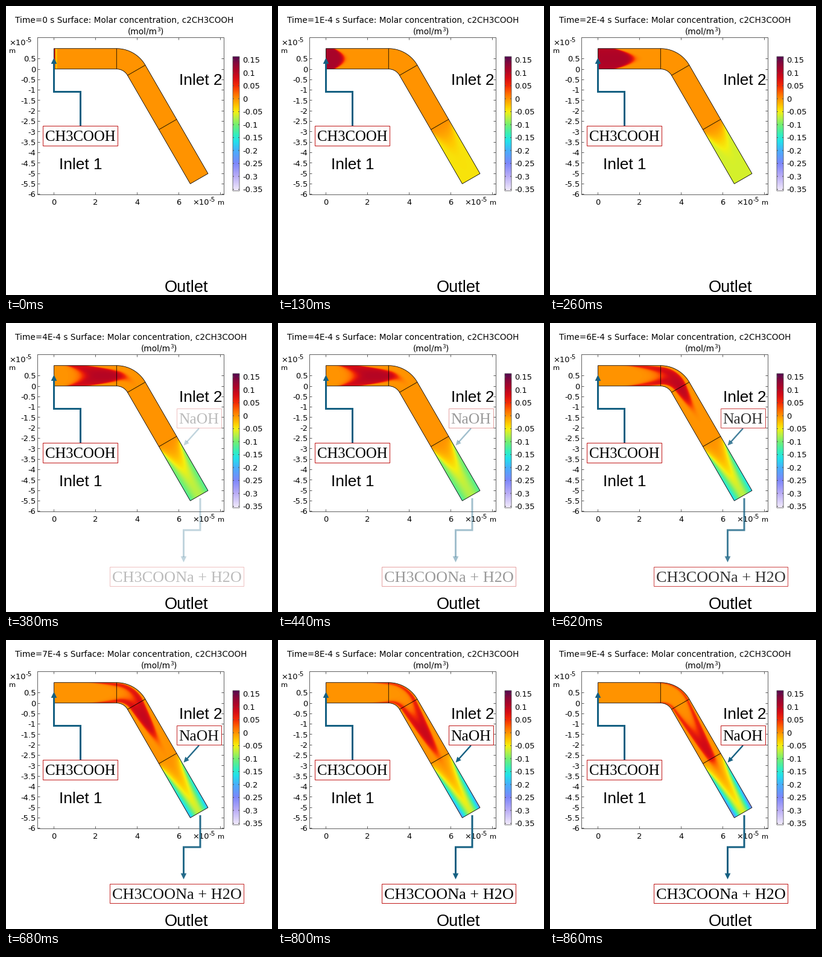
These frames come from a looping animation (441x480 px, 990 ms). A matplotlib script:

```python
import numpy as np
import matplotlib.pyplot as plt
from matplotlib.animation import FuncAnimation
from matplotlib.colors import LinearSegmentedColormap, Normalize
from matplotlib.patches import Polygon, Rectangle

W, H, DPI = 441, 480, 100
LOOP, TICK = 990, 10
PT = 72 / DPI
TEAL, RED = "#156082", "#c01818"
VMIN, VMAX = -0.356, 0.163

plt.rcParams["path.snap"] = False
fig = plt.figure(figsize=(W / DPI, H / DPI), dpi=DPI, facecolor="white")
ax = fig.add_axes([0, 0, 1, 1])
ax.set_xlim(0, W)
ax.set_ylim(H, 0)
ax.axis("off")


def text(x, y, s, px=13, font="DejaVu Sans", ha="left", **kw):
    return ax.text(x, y, s, fontsize=px * PT, family=font, ha=ha,
                   va="baseline", **kw)


def line(xs, ys, color="black", px=1.0, **kw):
    return ax.plot(xs, ys, color=color, lw=px * PT, solid_joinstyle="miter",
                   solid_capstyle="butt", **kw)[0]


def arrow(points, px, head=10, half=4.8):
    """Polyline with a filled head at its last point."""
    p = np.array(points, float)
    d = p[-1] - p[-2]
    d /= np.hypot(*d)
    side = np.array([-d[1], d[0]]) * half
    tip = p[-1].copy()
    base = tip - d * head
    p[-1] = base + d
    shaft = line(p[:, 0], p[:, 1], TEAL, px, zorder=6)
    cap = ax.add_patch(Polygon([tip, base + side, base - side],
                               fc=TEAL, ec="none", zorder=6))
    return [shaft, cap]


def boxed(x0, y0, x1, y1, s, px, base):
    box = ax.add_patch(Rectangle((x0, y0), x1 - x0, y1 - y0, fc="white",
                                 ec=RED, lw=PT, zorder=7))
    label = text((x0 + x1) / 2 - 0.5, base, s, px, "Liberation Serif",
                 "center", zorder=8)
    return [box, label]


# Colour scale
STOPS = [(VMIN, "#f2ebfb"), (-0.30, "#b9acf6"), (-0.25, "#7c86fb"),
         (-0.20, "#46b0fb"), (-0.165, "#22e2ec"), (-0.14, "#32eec0"),
         (-0.10, "#74f070"), (-0.075, "#b4f048"), (-0.05, "#f4f010"),
         (-0.03, "#ffcc00"), (0.0, "#ff9400"), (0.025, "#ff6200"),
         (0.05, "#f42c04"), (0.08, "#d80c14"), (0.11, "#b00426"),
         (0.14, "#84083c"), (VMAX, "#560a50")]
norm = Normalize(VMIN, VMAX, clip=True)
cmap = LinearSegmentedColormap.from_list(
    "prism", [((v - VMIN) / (VMAX - VMIN), c) for v, c in STOPS], 512)

# Channel: straight run, 60 degree bend, then two equal straight runs
X0, CX, CY = 79.5, 183.3, 125.7
R_IN, R_OUT, RUN = 21, 55, 104
R_MID, HALF = (R_IN + R_OUT) / 2, (R_OUT - R_IN) / 2
BEND = np.pi / 3
DIR = np.array([np.cos(BEND), np.sin(BEND)])
S1 = CX - X0
S2 = S1 + R_MID * BEND
S3 = S2 + RUN


def on_bend(r, a=BEND):
    a = np.asarray(a)
    return np.stack([CX + r * np.sin(a), CY - r * np.cos(a)], -1)


arc = np.linspace(0, BEND, 30)
outer = np.vstack([[X0, CY - R_OUT], on_bend(R_OUT, arc),
                   on_bend(R_OUT) + 2 * RUN * DIR])
inner = np.vstack([[X0, CY - R_IN], on_bend(R_IN, arc),
                   on_bend(R_IN) + 2 * RUN * DIR])
outline = np.vstack([outer, inner[::-1]])

# Pixel grid in flow coordinates: s along the channel, n across it
GX0, GX1, GY0, GY1 = 76, 340, 66, 300
gx, gy = np.meshgrid(np.arange(GX0, GX1) + 0.5, np.arange(GY0, GY1) + 0.5)
dx, dy = gx - CX, gy - CY
ang = np.arctan2(dx, -dy)
s = np.select([dx < 0, ang < BEND], [gx - X0, S1 + R_MID * ang],
              S2 + dx * DIR[0] + dy * DIR[1])
r = np.select([dx < 0, ang < BEND], [-dy, np.hypot(dx, dy)],
              dx * DIR[1] - dy * DIR[0])
n2 = np.clip((r - R_MID) / HALF, -1, 1) ** 2
depth = np.clip((s - S3) / RUN, 0, 1)


def sigmoid(x):
    return 1 / (1 + np.exp(-np.clip(x, -40, 40)))


def field(step):
    """Acid slug carried by the flow, minus base spreading from the outlet."""
    if step == 0:
        return (0.14 * np.exp(-(np.maximum(s, 0) / 1.5) ** 2)
                - 0.03 * np.exp(-((s - 4) / 1.2) ** 2))
    entry = step - np.maximum(s, 0) / (29.3 * (1 - 0.55 * n2))
    blur = 0.04 + 0.033 * step
    slug = sigmoid(entry / blur) * sigmoid((2.35 - entry) / blur)
    slug *= 0.118 * (1 - 0.025 * step) * np.exp(
        -0.14 * n2 * max(step - 1.5, 0))
    slug *= np.exp(-8 * depth)
    late = max(step - 2, 0)
    reach = 0.1 + (0.25 + 0.07 * late) * (1 - n2)
    bulk = 0.08 * (1 - np.exp(-step / 1.3)) * (1 - np.exp(-(depth / reach) ** 2))
    wall = 0.026 * late * n2 * depth ** 0.75
    return slug - bulk - wall


images = [cmap(norm(field(k))) for k in range(10)]

# Axes frame, ticks and labels
L, R, T, B = 52.5, 361.5, 52.5, 313.5
GRID = "#606060"
line([L, R, R, L, L], [T, T, B, B, T], GRID)
for i in range(14):
    v = 0.5 - 0.5 * i
    y = 105 - 34.6 * v
    mid = np.floor(y) + 0.5
    line([L, L + 4], [mid, mid], GRID)
    line([R - 4, R], [mid, mid], GRID)
    text(49.5, y + 4.8, f"{v:g}", ha="right")
for v in range(0, 9, 2):
    x = X0 + 34.5 * v
    mid = np.floor(x) + 0.5
    line([mid, mid], [B - 4, B], GRID)
    line([mid, mid], [T, T + 4], GRID)
    if v < 8:
        text(x, 329.5, str(v), ha="center")


def power(x, y):
    text(x, y, "×10")
    text(x + 27.5, y - 4.5, "-5", 10.5)


power(5, 65)
text(5, 78, "m", 11.5)
power(309, 329.5)
text(351.5, 329.5, "m", 11.5)

# Colour bar
ax.imshow(np.linspace(VMAX, VMIN, 256)[:, None], cmap=cmap, norm=norm,
          extent=(376, 387, 307, 84), aspect="auto", zorder=2)
ax.add_patch(Rectangle((376, 84), 11, 223, fc="none", ec="#505050",
                       lw=0.8 * PT, zorder=3))
for i in range(11):
    y = 89.5 + 21.5 * i
    line([376, 378], [y, y], "#505050", zorder=3)
    line([385, 387], [y, y], "#505050", zorder=3)
    text(392, y + 4.8, f"{(15 - 5 * i) / 100:g}")

# Channel
pic = ax.imshow(images[0], extent=(GX0, GX1, GY1, GY0), aspect="auto",
                interpolation="nearest", zorder=3)
edge = ax.add_patch(Polygon(outline, fc="none", ec="black", lw=0.8 * PT,
                            zorder=4))
pic.set_clip_path(edge)
for a, b in [(on_bend(R_IN, 0), on_bend(R_OUT, 0)),
             (on_bend(R_IN), on_bend(R_OUT)),
             (on_bend(R_IN) + RUN * DIR, on_bend(R_OUT) + RUN * DIR)]:
    line([a[0], b[0]], [a[1], b[1]], px=0.8, zorder=4)
ax.set_xlim(0, W)
ax.set_ylim(H, 0)

# Captions and callouts
for x, y, s_, px in [(88, 271, "Inlet 1", 26.2), (287, 131, "Inlet 2", 26.2),
                     (263, 475, "Outlet", 27.2)]:
    text(x, y, s_, px, "Liberation Sans", zorder=5)
arrow([(123.5, 199), (123.5, 142.5), (79.5, 142.5), (79.5, 86)], 3)
boxed(61.5, 199.5, 185.5, 232.5, "CH3COOH", 24.8, 224)
late_parts = (arrow([(320, 175), (294.5, 203.5)], 2.4, 9, 4.3)
              + arrow([(322, 291), (322, 344), (294.5, 344),
                       (294.5, 397.5)], 3)
              + boxed(283.5, 142.5, 357.5, 174.5, "NaOH", 25.6, 167)
              + boxed(172.5, 405.5, 394.5, 437.5, "CH3COONa + H2O", 26.2,
                      430))

title = text(15, 28, "", 13.6)
unit = [text(202, 46, "(mol/m", 13.6), text(250.5, 41.5, "3", 9),
        text(256, 46, ")", 13.6)]
unit_x = [t.get_position()[0] for t in unit]


def draw(i):
    t = i * TICK
    if t < 260:
        step, alpha = int(t >= 130), 0
    else:
        t = min(260 + (t - 260) // 60 * 60, 860)
        step, alpha = t // 95, min((t - 260) / 450, 1)
    pic.set_data(images[step])
    title.set_text(f"Time={f'{step}E-4' if step else 0} s "
                   "Surface: Molar concentration, c2CH3COOH")
    for label, x in zip(unit, unit_x):
        label.set_x(x + (22 if step else 0))
    for part in late_parts:
        part.set_alpha(alpha)
    return [pic, title, *unit, *late_parts]


anim = FuncAnimation(fig, draw, frames=LOOP // TICK, interval=TICK,
                     repeat=True, repeat_delay=0, blit=False)
plt.show()
```
